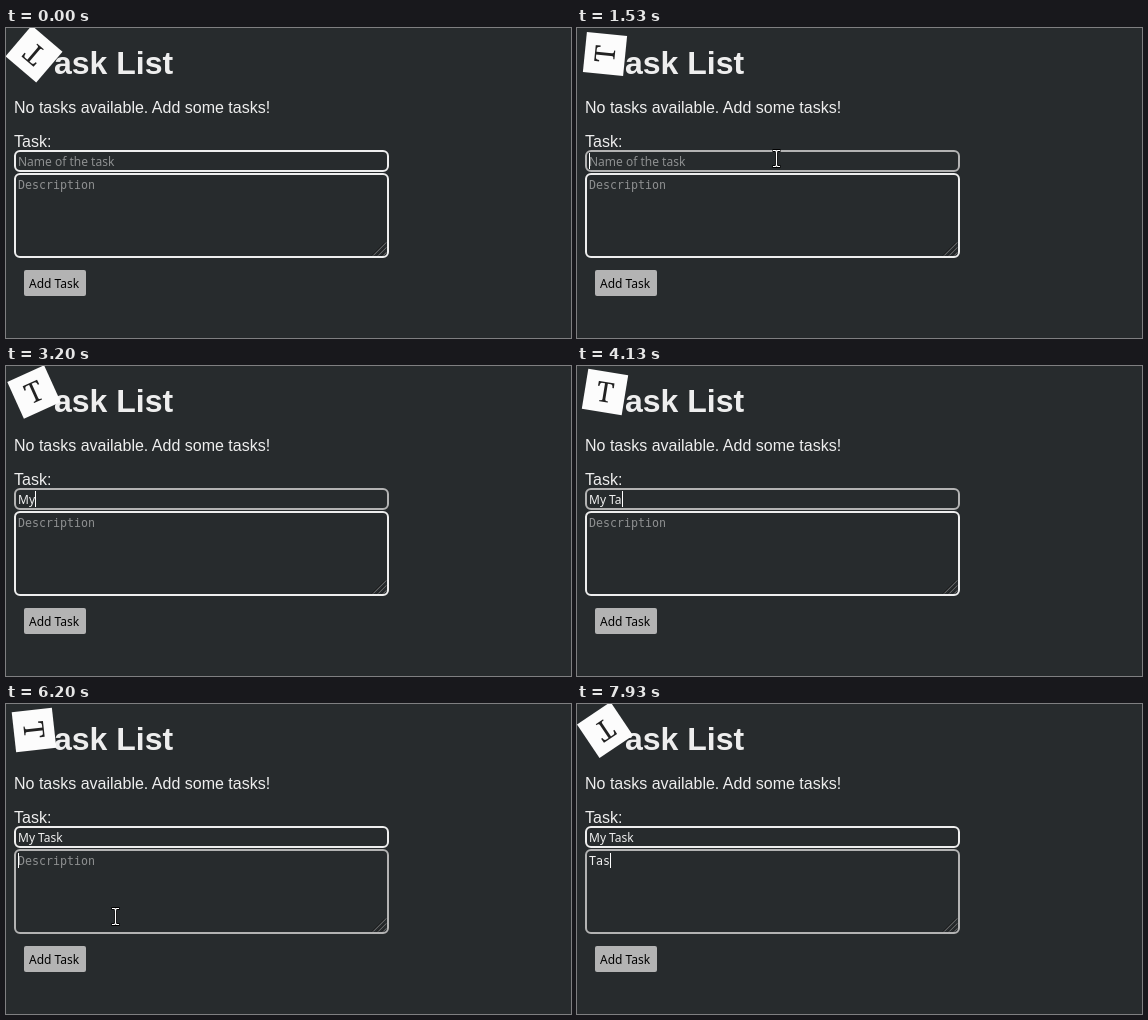
An HTML page for the animation above (8 s loop, 565 px wide and 310 px high).

```html
<!DOCTYPE html>
<html lang="en">
<head>
<meta charset="utf-8">
<title>Task List</title>
<style>
  html, body { margin: 0; width: 100%; height: 100%; overflow: hidden; background: #272b2d; }
  svg { display: block; }
  text { fill: #eee; white-space: pre; font: 16px "Liberation Sans", Arial, sans-serif; }
  .title { font-size: 32px; font-weight: bold; }
  .ui { font: 12px "Noto Sans", sans-serif; }
  .mono { font: 11.63px "DejaVu Sans Mono", monospace; }
  .tile { font: 500 28px "Noto Serif", serif; fill: #222; text-anchor: middle; }
  .box { fill: none; stroke-width: 2; }
</style>
</head>
<body>
<svg width="565" height="310" viewBox="0 0 565 310">
  <rect width="565" height="310" fill="#272b2d"/>
  <text class="title" x="48" y="46">ask List</text>
  <text x="8" y="85">No tasks available. Add some tasks!</text>
  <text x="8" y="119">Task:</text>

  <rect id="nameBox" class="box" x="9" y="123" width="373" height="20" rx="5"/>
  <text id="nameText" class="ui" x="12" y="138"></text>
  <rect id="noteBox" class="box" x="9" y="146" width="373" height="83" rx="5"/>
  <text id="noteText" class="mono" x="12" y="161"></text>
  <path d="M367 227.500L380 214.500M372 227.500L380 219.500M377 227.500L380 224.500" stroke="#999" fill="none"/>
  <path d="M366 227.500L379 214.500M371 227.500L379 219.500M376 227.500L379 224.500" stroke="#111" fill="none"/>

  <rect x="18" y="242" width="62" height="26" rx="2" fill="#b3b3b3"/>
  <text class="ui" x="23" y="260" style="fill:#000">Add Task</text>

  <rect id="caret" width="1" fill="#fff"/>

  <g id="tile">
    <rect x="-20.200" y="-20.200" width="40.400" height="40.400" fill="#fcfcfc"/>
    <text class="tile" y="10">T</text>
  </g>

  <g id="beam" fill="none">
    <path d="M-4 -8H-1L0 -7L1 -8H4M0 -7V7M-4 8H-1L0 7L1 8H4" stroke="#000" stroke-width="3"/>
    <path d="M-3.500 -8H-1L0 -7L1 -8H3.500M0 -7V7M-3.500 8H-1L0 7L1 8H3.500" stroke="#fff" stroke-width="1.200"/>
  </g>
  <path id="arrow" d="M.5 .5V16.500L4 13L6.500 18.500L9 17.500L6.500 12H11.500Z" fill="#fff" stroke="#000"/>
</svg>
<script>
const LOOP = 8000, STEP = 200 / 3, BLINK = 530;
const $ = id => document.getElementById(id);

// Each field: when it is clicked, and when each letter is typed.
const name = { box: $('nameBox'), label: $('nameText'), hint: 'Name of the task', value: 'My Task',
  click: 1400, keys: [2470, 2870, 3250, 3600, 3900, 4250, 4500], caretY: 125, caretH: 16 };
const note = { box: $('noteBox'), label: $('noteText'), hint: 'Description', value: 'Tas',
  click: 5900, keys: [7130, 7400, 7720], caretY: 149, caretH: 15 };

// Pointer stops as [time, x, y]; the pointer hides while typing.
const trips = [
  [[330, 499, 294], [600, 400, 205], [870, 270, 146], [1050, 215, 141], [1400, 199, 130],
   [1600, 199, 130], [2000, 216, 134], [2470, 216, 134]],
  [[5340, 216, 134], [5600, 135, 215], [5740, 113, 226], [5940, 109, 212], [7130, 109, 212]]
];

function pointerAt(t) {
  const trip = trips.find(p => t >= p[0][0] && t < p[p.length - 1][0]);
  if (!trip) return null;
  const i = trip.findIndex(p => p[0] > t);
  const [t0, x0, y0] = trip[i - 1], [t1, x1, y1] = trip[i];
  const u = (t - t0) / (t1 - t0), e = u * u * (3 - 2 * u);
  return [Math.round(x0 + (x1 - x0) * e), Math.round(y0 + (y1 - y0) * e)];
}

function show(el, visible) {
  el.style.display = visible ? '' : 'none';
}

function drawField(field, focused, t) {
  const count = field.keys.filter(k => k <= t).length;
  field.box.setAttribute('stroke', focused ? '#b3b3b3' : '#eee');
  field.label.textContent = count ? field.value.slice(0, count) : field.hint;
  field.label.style.fill = count ? '#eee' : '#8e9091';
  if (!focused) return;
  const since = t - (count ? field.keys[count - 1] : field.click);
  const caret = $('caret');
  caret.setAttribute('x', Math.round(12 + (count ? field.label.getComputedTextLength() : 0)));
  caret.setAttribute('y', field.caretY);
  caret.setAttribute('height', field.caretH);
  show(caret, since % (2 * BLINK) < BLINK);
}

function draw(now) {
  const step = Math.floor((now % LOOP + 4) / STEP) % 120;
  const t = step * STEP;
  $('tile').setAttribute('transform', `translate(28 26) rotate(${220.5 + 2.4 * step})`);

  const active = t >= note.click ? note : t >= name.click ? name : null;
  show($('caret'), false);
  for (const field of [name, note]) drawField(field, field === active, t);

  const pointer = pointerAt(t);
  const inField = pointer && pointer[0] < 383 && pointer[1] > 121 && pointer[1] < 230;
  show($('beam'), inField);
  show($('arrow'), pointer && !inField);
  if (pointer) {
    const [x, y] = pointer;
    $('beam').setAttribute('transform', `translate(${x + 0.5} ${y + 0.5})`);
    $('arrow').setAttribute('transform', `translate(${x} ${y})`);
  }
}

const start = performance.now();
function tick() {
  draw(performance.now() - start);
  requestAnimationFrame(tick);
}
tick();
</script>
</body>
</html>
```
